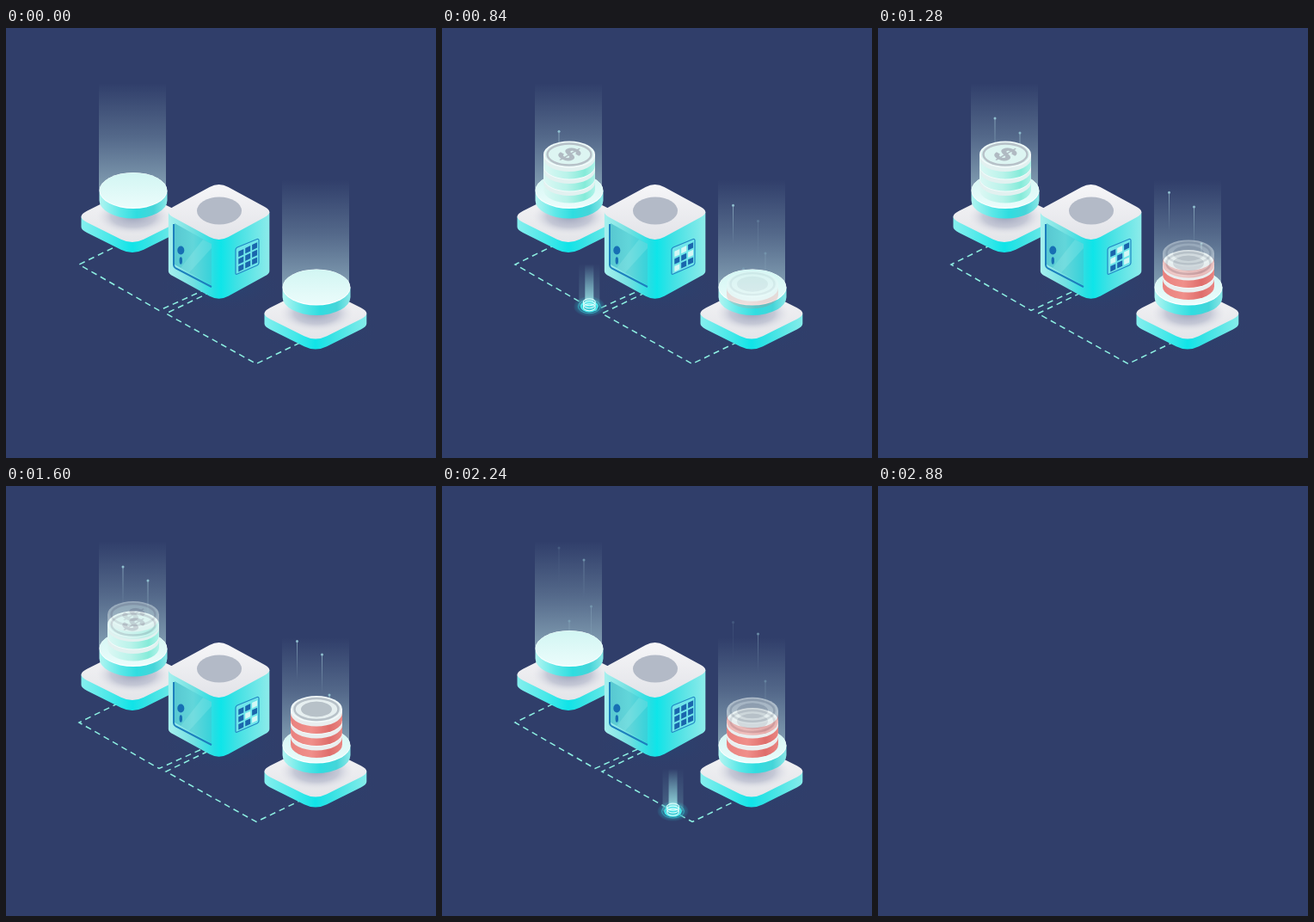
These frames come from a looping animation (500x500 px, 2920 ms). An HTML page:

```html
<!DOCTYPE html>
<html lang="en">
<head>
<meta charset="utf-8">
<title>Vault transfer</title>
<style>
  html, body { margin: 0; width: 100%; height: 100%; overflow: hidden; background: #303e6a; }
  svg { display: block; width: 100vw; height: 100vh; }
</style>
</head>
<body>
<svg id="stage" viewBox="0 0 500 500"></svg>
<script>
const LOOP = 2920, STEP = 40, BLANK = 2880;
const stage = document.getElementById('stage');

function add(parent, tag, attrs = {}) {
  const el = document.createElementNS('http://www.w3.org/2000/svg', tag);
  for (const k in attrs) el.setAttribute(k, attrs[k]);
  parent.appendChild(el);
  return el;
}
const ellipse = (p, cx, cy, rx, ry, attrs) => add(p, 'ellipse', { cx, cy, rx, ry, ...attrs });
const path = (p, d, attrs) => add(p, 'path', { d, ...attrs });
const clamp = v => Math.max(0, Math.min(1, v));
const ramp = (t, a, b) => clamp((t - a) / (b - a));
const ease = v => v * v * (3 - 2 * v);

// Gradients: stops are [offset, colour, opacity]
const defs = add(stage, 'defs');
function gradient(id, stops, attrs = {}, type = 'linearGradient') {
  const g = add(defs, type, { id, ...attrs });
  for (const [offset, color, alpha = 1] of stops)
    add(g, 'stop', { offset, 'stop-color': color, 'stop-opacity': alpha });
}
const down = { x1: 0, y1: 0, x2: 0, y2: 1 };
gradient('beam', [[0, '#b4dbe0', 0], [.5, '#b4dbe0', .27], [1, '#bce2e5', .6]], down);
gradient('slabTop', [[0, '#f4f4f6'], [1, '#e4e5e9']], down);
gradient('slabSide', [[0, '#86efee'], [.3, '#45e8e9'], [.5, '#10e4e8'], [.65, '#35e2e4'], [1, '#86ecea']]);
gradient('discTop', [[0, '#d2f6f3'], [1, '#ebfcfb']], down);
gradient('discSide', [[0, '#b4f5f1'], [.3, '#5de8e8'], [.55, '#2fdde0'], [.8, '#45d5d9'], [1, '#8ce8e7']]);
gradient('shade', [[0, '#8088a8', .75], [.6, '#a0a6be', .5], [1, '#dcdde6', 0]], {}, 'radialGradient');
gradient('cubeSide', [[0, '#a6f0ee'], [.25, '#71e0e1'], [.46, '#22dfe4'], [.52, '#0ee5e9'], [.68, '#42e1e4'], [1, '#8debea']]);
gradient('cubeTop', [[0, '#f6f6f8'], [1, '#e2e3e8']], down);
gradient('door', [[0, '#58c8d1'], [.5, '#62d6da'], [1, '#36d2da']]);
gradient('mintSide', [[0, '#dcf8f4'], [.45, '#b9f3ea'], [.8, '#84ebd9'], [1, '#b0f3e9']]);
gradient('redSide', [[0, '#e9827f'], [.4, '#f08f8a'], [.75, '#df6e6c'], [1, '#e98581']]);
gradient('halo', [[0, '#37e6ec', .8], [.5, '#2cb4c6', .6], [.75, '#2b93ad', .45], [1, '#2b7f9c', .15]], {}, 'radialGradient');
gradient('ray', [[0, '#9ff2f0', 0], [1, '#a8f8f5', .85]], down);
gradient('trail', [[0, '#b6dfe8', .55], [1, '#b6dfe8', 0]], down);
gradient('glow', [[0, '#1c4a7c', .55], [1, '#303e6a', 0]], {}, 'radialGradient');

// Rounded isometric diamond
function diamond(cx, cy, w, h, f) {
  const pts = [[cx, cy - h], [cx + w, cy], [cx, cy + h], [cx - w, cy]];
  const mix = (a, b) => [a[0] + (b[0] - a[0]) * f, a[1] + (b[1] - a[1]) * f];
  return pts.map((p, i) => {
    const from = mix(p, pts[(i + 3) % 4]), to = mix(p, pts[(i + 1) % 4]);
    return `${i ? 'L' : 'M'}${from} Q${p} ${to}`;
  }).join(' ') + 'Z';
}
function block(p, cx, cy, w, h, f, depth, top, side) {
  const e = w * (1 - f / 2);
  path(p, diamond(cx, cy + depth, w, h, f) + `M${cx - e} ${cy}h${2 * e}v${depth}h${-2 * e}Z`, { fill: `url(#${side})` });
  path(p, diamond(cx, cy, w, h, f), { fill: `url(#${top})` });
}
function cylinder(p, cx, cy, rx, ry, depth, top, side) {
  path(p, `M${cx - rx} ${cy}v${depth}a${rx} ${ry} 0 0 0 ${2 * rx} 0v${-depth}Z`, { fill: side });
  ellipse(p, cx, cy, rx, ry, { fill: top });
}

const scene = add(stage, 'g');

// Soft ground tints
ellipse(scene, 250, 300, 72, 30, { fill: 'url(#glow)' });
ellipse(scene, 362, 348, 72, 34, { fill: 'url(#glow)' });

// Dashed routes
const routes = ['M136 250L85 275L178 328.5L232 304', 'M240 306L186 332L291 390.5L350 362'].map(d =>
  path(scene, d, { fill: 'none', stroke: '#8df0e2', 'stroke-width': 1.5, 'stroke-dasharray': '7 5' }));

// Travelling scanner
const scanner = add(scene, 'g');
ellipse(scanner, 0, 0, 18, 11.5, { fill: 'url(#halo)' });
ellipse(scanner, 0, 0, 13, 8, { fill: 'none', stroke: '#35c8d4', 'stroke-opacity': .6 });
add(scanner, 'rect', { x: -12, y: -50, width: 24, height: 50, fill: 'url(#ray)', opacity: .25 });
add(scanner, 'rect', { x: -5, y: -49, width: 10, height: 49, fill: 'url(#ray)' });
ellipse(scanner, 0, 0, 9.5, 6, { fill: '#39e5e9', 'fill-opacity': .6, stroke: '#4cf2f2', 'stroke-width': 1.5 });
for (const y of [1, -2, -5])
  ellipse(scanner, 0, y, 7, 4, { fill: 'none', stroke: '#d8fdfb', 'stroke-width': 1.2 });

// Station: slab, beam, disc and a stack of three coins
function coin(p, cx, cy, kind) {
  const g = add(p, 'g');
  const red = kind === 'red';
  // Coloured edge below a pale lip
  cylinder(g, cx, cy + 4, 30, 15.5, 9, 'none', `url(#${kind}Side)`);
  cylinder(g, cx, cy, 30, 15.5, 4.5, '#f4fbfb', red ? '#e9eeef' : '#e2f1f0');
  ellipse(g, cx, cy, 28.5, 14.2, { fill: red ? '#e6eff0' : '#ddf5f2' });
  ellipse(g, cx, cy, 25.5, 12.5, { fill: 'none', stroke: '#b7c1c8', 'stroke-width': 2.4 });
  if (red) ellipse(g, cx, cy, 18, 9, { fill: '#b7c1c8' });
  else add(g, 'text', {
    transform: `matrix(.866 .5 -.866 .5 ${cx} ${cy})`, y: 10, 'text-anchor': 'middle',
    'font-family': 'Inter, Arial, sans-serif', 'font-weight': 800, 'font-size': 29, fill: '#b0bac2'
  }).textContent = '$';
  return g;
}
function station(cx, cy, kind, motes) {
  block(scene, cx - 1.1, cy + 30.3, 66, 33, .2, 12, 'slabTop', 'slabSide');
  ellipse(scene, cx, cy + 30, 43, 21, { fill: 'url(#shade)' });
  add(scene, 'rect', { x: cx - 40, y: cy - 125, width: 78, height: 125, fill: 'url(#beam)' });
  const dots = motes.map(m => {
    const g = add(scene, 'g');
    add(g, 'rect', { x: -.5, y: 0, width: 1, height: 45, fill: 'url(#trail)' });
    add(g, 'circle', { r: 1.5, fill: '#8fbfcf' });
    return { g, m };
  });
  cylinder(scene, cx, cy, 39.5, 21, 11.5, '#ffffff', 'url(#discSide)');
  ellipse(scene, cx, cy - .4, 39, 20.3, { fill: 'url(#discTop)' });
  const coins = [0, 1, 2].map(i => coin(scene, cx, cy - 14 - i * 14, kind));
  return { dots, coins };
}

// Motes: x, y at time 0, speed (px/ms), fade in start, fade out start
const left = station(148, 189, 'mint', [
  [136, 149.2, .0345, 380, 1760],
  [165, 170, .0375, 1000, 2000],
  [173.5, 196, .025, 1500, 1900],
  [148, 213, .025, 1700, 1900]
]);
const right = station(361, 301.5, 'red', [
  [338.5, 235, .0341, 300, 1760],
  [367.5, 256, .0375, 760, 2000],
  [376, 283, .025, 740, 1860],
  [350.5, 301, .025, 740, 1600]
]);

// Coin timing, bottom to top: in start, in end, out start, out end
const leftTimes = [[0, 280, 1780, 2040], [160, 440, 1600, 1850], [320, 600, 1460, 1700]];
const rightTimes = [[770, 1050, 2440, 2700], [950, 1230, 2280, 2540], [1150, 1450, 2120, 2380]];

// Vault
block(scene, 247.6, 214, 64.2, 35, .17, 68.6, 'cubeTop', 'cubeSide');
path(scene, 'M196 227L239 251V299L196 275Z', { fill: 'url(#door)' });
path(scene, 'M203 279L229 246L239 251V256L213 284.5Z', { fill: '#b5f3f0', opacity: .2 });
path(scene, 'M195 228V275.5Q195 278 197.5 279.5L239 301', { fill: 'none', stroke: '#1c7fbd', 'stroke-width': 2 });
ellipse(scene, 203.3, 258.5, 4, 4.9, { fill: '#176fb3' });
ellipse(scene, 203.3, 270.5, 1.7, 4.2, { fill: '#176fb3' });
ellipse(scene, 248, 212.5, 26, 16, { fill: '#b3bac7' });

// Keypad
path(scene, 'M267 258Q267 256 269 255L292 245.5Q294 245 294 247V273Q294 275 292 276L269 286Q267 287 267 285Z',
  { fill: '#6fe6ea', stroke: '#2187c4', 'stroke-width': 1.2 });
const keys = [];
for (let r = 0; r < 3; r++) for (let c = 0; c < 3; c++)
  keys.push(path(scene, `M${270.3 + c * 7.9} ${259.8 + r * 8.6 - c * 3.9}l6 -2.8v6.4l-6 2.8Z`, {}));

// Lit keys: key, on, off
const lit = [[7, 400, 640], [5, 400, 520], [0, 600, 1000], [1, 760, 1400], [5, 680, 1360],
  [6, 720, 1080], [3, 1080, 1520], [8, 1160, 1680], [2, 1480, 1840], [4, 1600, 1840]];

function showCoins(coins, times, t) {
  coins.forEach((g, i) => {
    const [a, b, c, d] = times[i];
    const v = ramp(t, a, b) * (1 - ramp(t, c, d));
    g.setAttribute('opacity', v);
    g.setAttribute('transform', `translate(0 ${(1 - ease(v)) * (12 - 4 * i)})`);
  });
}
function showDots(dots, t) {
  for (const { g, m: [x, y, speed, from, to] } of dots) {
    g.setAttribute('transform', `translate(${x} ${y - speed * t})`);
    g.setAttribute('opacity', ramp(t, from, from + 300) * (1 - ramp(t, to, to + 600)));
  }
}
function showScanner(t) {
  const second = t > 1300;
  const [a, b, x0, x1] = second ? [1750, 2370, 184, 291] : [280, 890, 85, 179];
  const x = x0 + (x1 - x0) * ramp(t, a, b);
  scanner.setAttribute('transform', `translate(${x} ${275.5 + (x - 85) * .559})`);
  scanner.setAttribute('opacity', ramp(t, a - 80, a + 60) * (1 - ramp(t, b - 20, b + 100)));
}

function render(t) {
  scene.setAttribute('visibility', t >= BLANK ? 'hidden' : 'visible');
  routes.forEach(r => r.setAttribute('stroke-dashoffset', -1.4 - 8 * t / LOOP));
  showScanner(t);
  showCoins(left.coins, leftTimes, t);
  showCoins(right.coins, rightTimes, t);
  showDots(left.dots, t);
  showDots(right.dots, t);
  keys.forEach((k, i) => {
    const on = lit.some(([key, a, b]) => key === i && t >= a && t < b);
    k.setAttribute('fill', on ? '#d3f7f5' : '#1a66ad');
  });
}

const start = performance.now();
function tick() {
  const t = (performance.now() - start) % LOOP;
  render(Math.floor(t / STEP) * STEP);
  requestAnimationFrame(tick);
}
tick();
</script>
</body>
</html>
```
